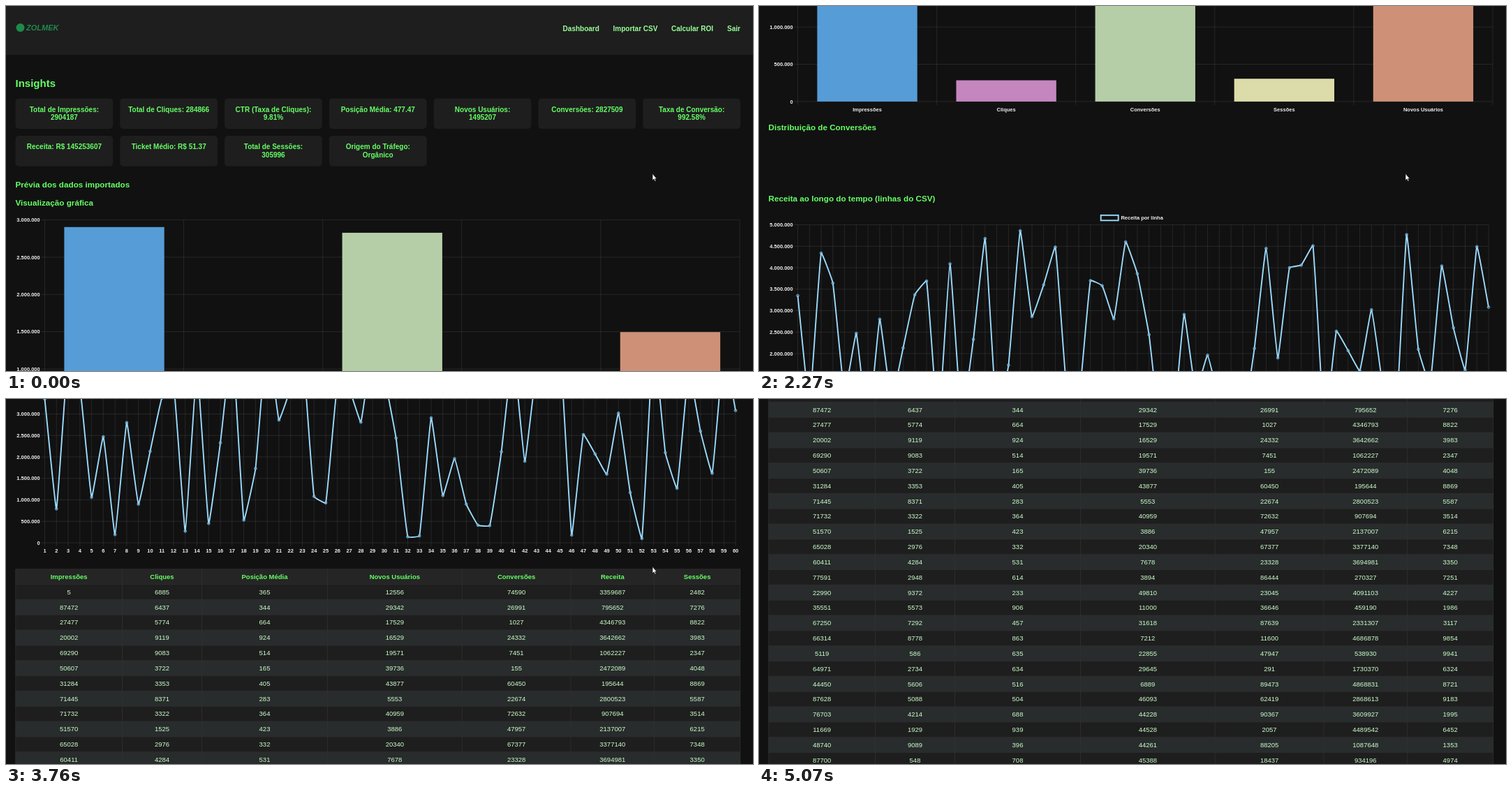
Write an HTML page that moves like this. It is 1070 by 523 pixels and loops after 5.49 s.

```html
<!DOCTYPE html>
<html lang="pt-BR">
<head>
<meta charset="utf-8">
<title>Insights</title>
<style>
  html, body { margin: 0; width: 100%; height: 100%; overflow: hidden; background: #111; }
  svg { display: block; width: 100%; height: 100%; font-family: Arial, "Liberation Sans", sans-serif; }
  text { font-weight: bold; font-size: 10px; fill: #66ff66; }
  .nav { fill: #99ff99; }
  .h2 { font-size: 15px; }
  .h3 { font-size: 11.7px; }
  .tick { font-size: 7.5px; fill: #eee; }
  .th { font-size: 9.5px; }
  .td { font-size: 9.5px; font-weight: normal; fill: #ccffcc; }
  .logo { font-size: 11px; font-style: italic; fill: #1f8a4c; }
  .grid { stroke: #fff; stroke-opacity: .13; stroke-width: .7; }
  .border { stroke: #333; stroke-width: .7; }
</style>
</head>
<body>
<svg viewBox="0 0 1070 523">
  <g id="page"></g>
  <path id="cursor" d="M926 240.3V249.8L928.1 247.9L929.6 251.2L931.1 250.5L929.7 247.4H932.2Z" fill="#fff" stroke="#111" stroke-width=".7"/>
</svg>
<script>
const LEFT = 13.5, RIGHT = 1052;
const page = document.getElementById('page');
const cursor = document.getElementById('cursor');

function add(tag, attrs, content) {
  const node = document.createElementNS('http://www.w3.org/2000/svg', tag);
  for (const key in attrs) node.setAttribute(key, attrs[key]);
  if (content !== undefined) node.textContent = content;
  return page.appendChild(node);
}
const label = (content, x, y, cls = '', anchor = 'start') =>
  add('text', { x, y, class: cls, 'text-anchor': anchor }, content);
const box = (x, y, width, height, fill, rx = 0) => add('rect', { x, y, width, height, fill, rx });
const line = (x1, y1, x2, y2, cls = 'grid') => add('line', { x1, y1, x2, y2, class: cls });
const thousands = n => String(n).replace(/\B(?=(\d{3})+$)/g, '.');

let seed = 7;
function randomBelow(max) {
  seed = (seed * 16807) % 2147483647;
  return Math.floor(seed / 2147483647 * max);
}

function drawHeader() {
  box(0, 0, 1070, 70, '#1e1e1e');
  add('circle', { cx: 20.5, cy: 31, r: 6, fill: '#1f8a4c' });
  label('ZOLMEK', 29, 35, 'logo');
  label('Dashboard', 797.6, 36, 'nav');
  label('Importar CSV', 869.5, 36, 'nav');
  label('Calcular ROI', 953, 36, 'nav');
  label('Sair', RIGHT, 36, 'nav', 'end');
}

function drawCards() {
  const cards = [
    ['Total de Impressões:', '2904187'], ['Total de Cliques: 284866'],
    ['CTR (Taxa de Cliques):', '9.81%'], ['Posição Média: 477.47'],
    ['Novos Usuários:', '1495207'], ['Conversões: 2827509'],
    ['Taxa de Conversão:', '992.58%'], ['Receita: R$ 145253607'],
    ['Ticket Médio: R$ 51.37'], ['Total de Sessões:', '305996'],
    ['Origem do Tráfego:', 'Orgânico']
  ];
  const pitch = (RIGHT - LEFT + 10) / 7, width = pitch - 10;
  cards.forEach((lines, i) => {
    const x = LEFT + (i % 7) * pitch, y = 132.4 + Math.floor(i / 7) * 53.7;
    box(x, y, width, 43.6, '#1e1e1e', 5);
    lines.forEach((s, k) => label(s, x + width / 2, y + 19.1 + k * 11.9, '', 'middle'));
  });
}

function drawScale(top, bottom, right, max) {
  for (let v = 0; v <= max; v += 5e5) {
    const y = bottom - (bottom - top) * v / max;
    line(50.5, y, right, y);
    label(thousands(v), 48.7, y + 2.6, 'tick', 'end');
  }
}

function drawBars() {
  const bars = [
    ['Impressões', 2904187, '#569cd6'], ['Cliques', 284866, '#c586c0'],
    ['Conversões', 2827509, '#b5cea8'], ['Sessões', 305996, '#dcdcaa'],
    ['Novos Usuários', 1495207, '#ce9178']
  ];
  const top = 306.5, bottom = 626.9, x0 = 55.5, pitch = 199.1;
  drawScale(top, bottom, x0 + 5 * pitch, 3e6);
  for (let i = 0; i <= 5; i++) line(x0 + i * pitch, top, x0 + i * pitch, bottom + 5);
  bars.forEach(([name, value, color], i) => {
    const mid = x0 + (i + .5) * pitch, h = (bottom - top) * value / 3e6;
    box(mid - pitch * .36, bottom - h, pitch * .72, h, color);
    label(name, mid, 640.7, 'tick', 'middle');
  });
}

// Revenue per CSV line, in units of 10 000.
const revenue = [
  335, 79, 434, 364, 106, 247, 19, 280, 90, 213, 337, 369, 27, 409, 45, 233, 468, 53, 173, 486,
  286, 360, 448, 108, 93, 370, 358, 281, 460, 386, 244, 14, 16, 291, 110, 196, 90, 41, 40, 212,
  445, 190, 400, 406, 451, 18, 252, 207, 160, 302, 117, 10, 477, 210, 127, 404, 260, 162, 449, 308
];

// Bézier handles weighted by the distance to each neighbour.
function splinePath(points, tension) {
  const handles = points.map((p, i) => {
    const a = points[i - 1] || p, b = points[i + 1] || p;
    const da = Math.hypot(p[0] - a[0], p[1] - a[1]), db = Math.hypot(b[0] - p[0], b[1] - p[1]);
    const shift = d => [0, 1].map(k => p[k] + tension * d / (da + db) * (b[k] - a[k]));
    return { before: shift(-da), after: shift(db) };
  });
  return points.map((p, i) =>
    i ? `C${handles[i - 1].after} ${handles[i].before} ${p}` : `M${p}`).join('');
}

function drawRevenue() {
  const top = 803.5, bottom = 1111, x0 = 55.5, pitch = 16.772, blue = '#9cdcfe';
  add('rect', { x: 489.7, y: 789.8, width: 25, height: 7.5, fill: 'none', stroke: blue, 'stroke-width': 1.9 });
  label('Receita por linha', 518.4, 796.2, 'tick');
  drawScale(top, bottom, x0 + 59 * pitch, 5e6);
  const points = revenue.map((v, i) => [x0 + i * pitch, bottom - (bottom - top) * v / 500]);
  points.forEach(([x], i) => {
    line(x, top, x, bottom + 5);
    label(i + 1, x, 1124.6, 'tick', 'middle');
  });
  add('path', { d: splinePath(points, .1), fill: 'none', stroke: blue, 'stroke-width': 1.9, 'stroke-linejoin': 'round' });
  for (const [cx, cy] of points)
    add('circle', { cx, cy, r: 1.9, fill: '#569cd6', 'fill-opacity': .5, stroke: blue, 'stroke-width': .6 });
}

function drawTable() {
  const below = max => () => randomBelow(max);
  const columns = [
    ['Impressões', 152.7, below(95000)], ['Cliques', 114, below(10000)],
    ['Posição Média', 180, below(1000)], ['Novos Usuários', 192.7, below(50000)],
    ['Conversões', 155.8, below(98000)], ['Receita', 119.6, row => revenue[row] * 1e4 + randomBelow(1e4)],
    ['Sessões', 123.1, below(10000)]
  ];
  const top = 1148.8, pitch = 21.83, rows = 25, bottom = top + (rows + 1) * pitch;
  for (let r = 0; r <= rows; r++) {
    const y = top + r * pitch;
    box(LEFT, y, RIGHT - LEFT, pitch, r === 0 ? '#252525' : r % 2 ? '#1e1e1e' : '#282c2c');
    line(LEFT, y, RIGHT, y, 'border');
  }
  let x = LEFT + .3;
  line(x, top, x, bottom, 'border');
  for (const [title, width, valueAt] of columns) {
    const mid = x + width / 2;
    label(title, mid, top + 14.3, 'th', 'middle');
    for (let r = 0; r < rows; r++)
      label(valueAt(r), mid, top + (r + 1) * pitch + 14.2, 'td', 'middle');
    x += width;
    line(x, top, x, bottom, 'border');
  }
}

drawHeader();
label('Insights', LEFT, 116, 'h2');
drawCards();
label('Prévia dos dados importados', LEFT, 260.2, 'h3');
label('Visualização gráfica', LEFT, 285.6, 'h3');
drawBars();
label('Distribuição de Conversões', LEFT, 668, 'h3');
label('Receita ao longo do tempo (linhas do CSV)', LEFT, 769.7, 'h3');
drawRevenue();
drawTable();

const LOOP = 5490, FRAME = 67, NOTCH = 62.5, CURSOR_HIDES = 4800;
const bursts = [
  { start: 590, duration: 250, notches: 1 },
  { start: 940, duration: 558, notches: 3 },
  { start: 1870, duration: 419, notches: 4 },
  { start: 2530, duration: 445, notches: 3 },
  { start: 3290, duration: 924, notches: 6 },
  { start: 4310, duration: 424, notches: 2 }
];

// Each wheel burst advances the page in whole screen frames.
function scrollAt(time) {
  return bursts.reduce((sum, { start, duration, notches }) => {
    const elapsed = (Math.floor((time - start) / FRAME) + 1) * FRAME;
    return sum + NOTCH * notches * Math.min(1, Math.max(0, elapsed / duration));
  }, 0);
}

function render() {
  const time = performance.now() % LOOP;
  page.setAttribute('transform', `translate(0 ${-Math.round(scrollAt(time))})`);
  cursor.setAttribute('visibility', time < CURSOR_HIDES ? 'visible' : 'hidden');
  requestAnimationFrame(render);
}
render();
</script>
</body>
</html>
```
